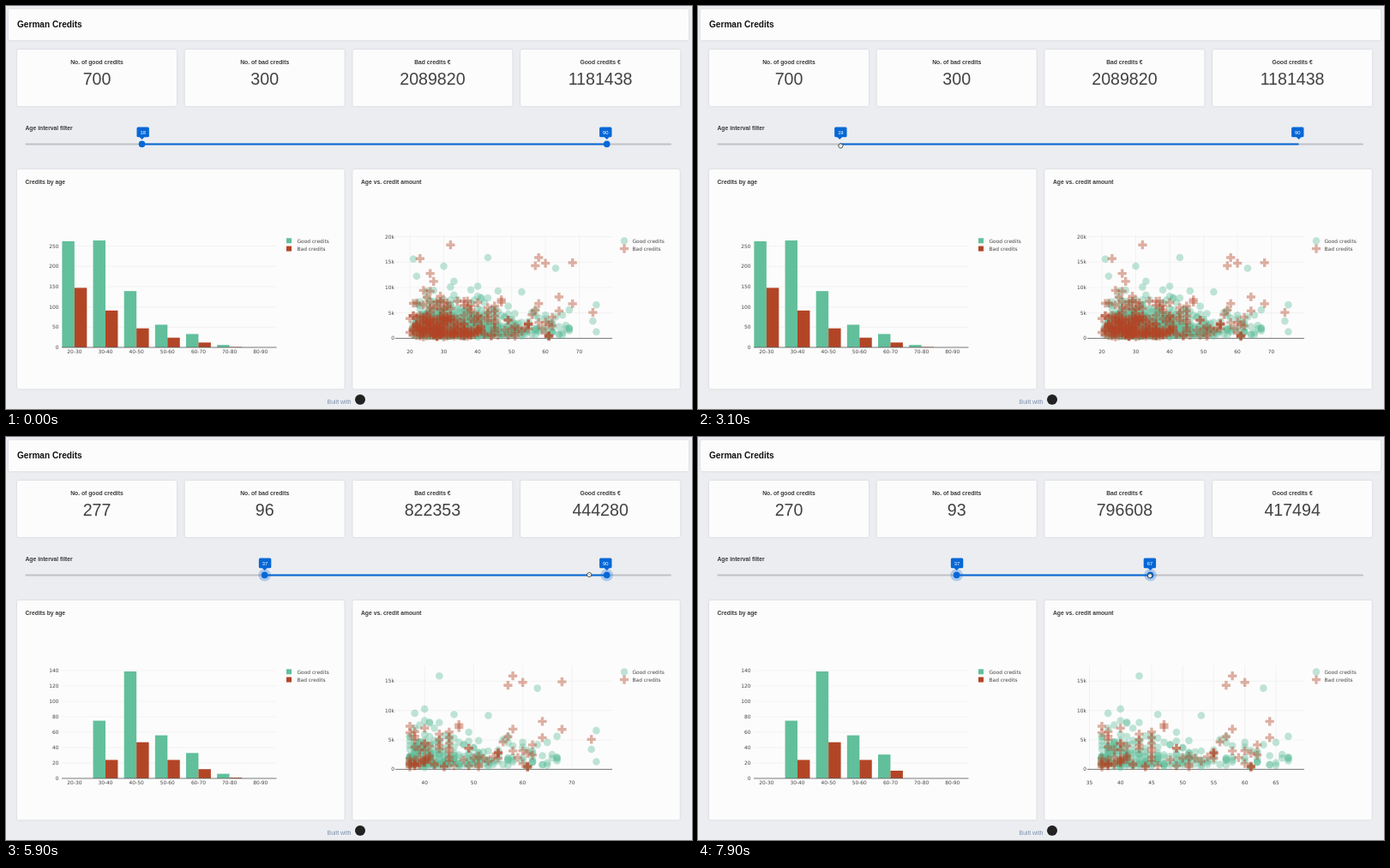
An HTML page that plays this animation: 800x471 px, repeating every 8 s.

```html
<!DOCTYPE html>
<html lang="en">
<head>
<meta charset="utf-8">
<title>German Credits</title>
<style>
html, body { margin: 0; height: 100%; overflow: hidden; background: #ebedf1; }
svg { display: block; width: 100vw; height: 100vh; font-family: "Liberation Sans", Arial, sans-serif; }
.card { fill: #fcfcfc; filter: drop-shadow(0 .5px 1px #0002); }
.head { font-weight: bold; font-size: 6.75px; fill: #3a3a3a; }
.num { font-size: 19.6px; fill: #424242; }
.axis { font: 5.9px "DejaVu Sans", Verdana, sans-serif; fill: #444; }
.grid { stroke: #eee; stroke-width: .7; }
.zero { stroke: #555; stroke-width: .8; }
.pin { font-size: 5.8px; fill: #fff; }
.mid { text-anchor: middle; }
.end { text-anchor: end; }
</style>
</head>
<body>
<svg viewBox="0 0 800 471">
  <g id="page"></g>
  <g id="data"></g>
  <g id="tools"></g>
  <g id="slider"></g>
  <g id="cursor"></g>
</svg>
<script>
const GREEN = '#62bf9b', RED = '#b24526', BLUE = '#0668d6';
const LOOP = 8000;
const $ = id => document.getElementById(id);
const clamp = (v, a, b) => Math.min(b, Math.max(a, v));

const text = (x, y, s, cls, extra = '') => `<text x="${x}" y="${y}" class="${cls}" ${extra}>${s}</text>`;
const rect = (x, y, w, h, attrs) => `<rect x="${x}" y="${y}" width="${w}" height="${h}" ${attrs}/>`;
const line = (x1, y1, x2, y2, cls) => `<path d="M${x1} ${y1}L${x2} ${y2}" class="${cls}"/>`;
const card = (x, y, w, h) => rect(x, y, w, h, 'rx="2" class="card"');
const dot = (x, y) => `<circle cx="${x}" cy="${y}" r="4.3" fill="${GREEN}" opacity=".4"/>`;
const plus = (x, y) => `<path transform="translate(${x} ${y})" fill="${RED}" opacity=".42"
  d="M-1.7-5.1h3.4v3.4h3.4v3.4h-3.4v3.4h-3.4v-3.4h-3.4v-3.4h3.4z"/>`;

// Scatter points [age, thousands]: seeded log-normal in both directions, plus a few extremes
let seed = 4242;
function random() {
  seed = (seed * 16807) % 2147483647;
  return seed / 2147483647;
}
const normal = () => Math.sqrt(-2 * Math.log(random())) * Math.cos(2 * Math.PI * random());

function sample(count, ageScale, ageSpread, median, spread) {
  return Array.from({ length: count }, () => {
    let age, amount;
    do age = Math.floor(19.5 + ageScale * Math.exp(ageSpread * normal())); while (age > 67);
    do amount = median * Math.exp(spread * normal()); while (amount < .3 || amount > 16 - age * .12);
    return [age, amount];
  });
}

const good = [
  ...sample(693, 14, .72, 2, .72),
  [21, 15.6], [30, 14.2], [43, 15.9], [63, 13.8], [75, 6.6], [74, 3.4], [75, 1.3]
];
const bad = [
  ...sample(292, 11.5, .82, 2.1, .85),
  [32, 18.4], [23, 15.7], [57, 14.3], [58, 15.9], [60, 14.8], [68, 14.9], [68, 6.8], [74, 5.1]
];

// Good and bad bars per decade; each filter cuts into one decade and drops those beyond it
const allBars = [[262, 264, 139, 56, 33, 6, 0], [147, 91, 47, 24, 12, 1, 0]];
const olderBars = allBars.map((row, i) => [0, [75, 24][i], ...row.slice(2)]);
const middleBars = olderBars.map((row, i) => [...row.slice(0, 4), [31, 10][i], 0, 0]);

const views = [
  { totals: [700, 300, 2089820, 1181438], ages: [18, 90], bars: allBars },
  { totals: [277, 96, 822353, 444280], ages: [37, 90], bars: olderBars },
  { totals: [270, 93, 796608, 417494], ages: [37, 67], bars: middleBars }
];

const cardX = i => 13 + i * 195.7;

function drawPage() {
  const titles = ['No. of good credits', 'No. of bad credits', 'Bad credits €', 'Good credits €'];
  let s = card(3, 3.5, 793, 36.5) + text(13, 25.2, 'German Credits', 'head', 'style="font-size:10.1px;fill:#111"');
  titles.forEach((title, i) => {
    s += card(cardX(i), 51, 186, 66) + text(cardX(i) + 93, 67.8, title, 'head mid');
  });
  s += text(22.5, 144.5, 'Age interval filter', 'head');
  s += card(13, 191, 381.5, 256.5) + card(404.3, 191, 381.5, 256.5);
  s += text(22.5, 208, 'Credits by age', 'head') + text(414, 208, 'Age vs. credit amount', 'head');
  s += rect(327, 271.3, 6, 6, `fill="${GREEN}"`) + rect(327, 280.6, 6, 6, `fill="${RED}"`);
  s += dot(721, 274.5) + plus(721, 283.6);
  for (const x of [339.5, 730.5])
    s += text(x, 276.6, 'Good credits', 'axis') + text(x, 285.9, 'Bad credits', 'axis');
  s += text(374.5, 465, 'Built with', '', 'font-size="7" fill="#7c8fad"');
  s += '<circle cx="413" cy="460" r="6" fill="#222"/>';
  $('page').innerHTML = s;
}

function drawBars(bars) {
  const base = 399, pitch = 36.15, width = 14.45;
  const top = Math.max(...bars.flat()), unit = 125 / top, step = top > 200 ? 50 : 20;
  let s = '';
  for (let n = 0; n <= top + 1; n += step) {
    const y = base - n * unit;
    if (n) s += line(65, y, 315.5, y, 'grid');
    s += text(61.5, y + 2, n, 'axis end');
  }
  bars.forEach((row, side) => row.forEach((n, i) => {
    const x = 65.4 + i * pitch + side * width;
    s += rect(x, base - n * unit, width, n * unit, `fill="${side ? RED : GREEN}"`);
    if (side) s += text(x, 406, `${20 + i * 10}-${30 + i * 10}`, 'axis mid');
  }));
  return s + line(65, base, 315.5, base, 'zero');
}

function drawScatter([from, to]) {
  const base = 388.4;
  const [goods, bads] = [good, bad].map(list => list.filter(([age]) => age >= from && age <= to));
  const all = [...goods, ...bads], ages = all.map(p => p[0]);
  const low = Math.min(...ages), high = Math.max(...ages), top = Math.max(...all.map(p => p[1]));
  const unit = 217.4 / (high - low), kUnit = 109.2 / top, step = high - low > 35 ? 10 : 5;
  const toX = age => +(471 + (age - low) * unit).toFixed(1);
  const toY = k => +(base - k * kUnit).toFixed(1);
  let s = '';
  for (let age = 0; toX(age) < 707; age += step)
    if (toX(age) > 453) s += line(toX(age), 267, toX(age), base, 'grid') + text(toX(age), 406, age, 'axis mid');
  for (let k = 0; toY(k) > 267; k += 5) {
    s += line(454, toY(k), 707, toY(k), k ? 'grid' : 'zero');
    s += text(453, toY(k) + 2, k ? k + 'k' : 0, 'axis end');
  }
  const marks = (points, mark) => points.map(([age, k]) => mark(toX(age), toY(k))).join('');
  return s + marks(goods, dot) + marks(bads, plus);
}

function drawData(v) {
  const totals = v.totals.map((n, i) => text(cardX(i) + 93, 92.3, n, 'num mid')).join('');
  $('data').innerHTML = totals + drawBars(v.bars) + drawScatter(v.ages);
}

function drawTools() {
  const icon = (x, d) => `<path transform="translate(${x} 224.3)" d="${d}"/>`;
  const box = 'M-3-3h6v6h-6z';
  $('tools').innerHTML = `<g fill="none" stroke="#d0d0d2" stroke-width="1.3">
    ${icon(261, 'M-3.4-1.6h2l.6-1h1.6l.6 1h2v4h-6.8zM-1 .5a1 1 0 1 0 2 0a1 1 0 1 0-2 0')}
    <g stroke="#8e8e92">${icon(276, 'M-2.6-.6a2.2 2.2 0 1 0 4.4 0a2.2 2.2 0 1 0-4.4 0M1.4 1.2L3.6 3.4M-1.4-.6h2')}</g>
    ${icon(288, 'M-3.6 0h7.2M0-3.6v7.2')}
    <g stroke-dasharray="1.5 .9">${icon(300, box)}</g>
    ${icon(312, 'M-2 3.4q1-1 0-2a3 2.4 0 1 1 3 .2z')}
    <g fill="#d0d0d2">${icon(327, box) + icon(339, box)}</g>
    <g stroke="#fcfcfc" stroke-width="1">${icon(327, 'M-2 0h4M0-2v4') + icon(339, 'M-2 0h4')}</g>
    ${icon(350.5, 'M-3-3l6 6M3-3l-6 6')}
    ${icon(362.5, 'M-3.4 0L0-2.8L3.4 0M-2 0v2.4h4v-2.4')}
    </g>` + rect(374, 220.3, 8, 8, 'fill="#7f90ac"');
}

const ageX = age => 23 + age * 7.53;

function drawSlider(lo, hi, mode) {
  const y = 161.4;
  const track = (a, b, color) => rect(a, y - 1, b - a, 2, `rx="1" fill="${color}"`);
  let s = track(22.5, 776, '#c0c1c6') + track(lo, hi, BLUE);
  for (const x of [lo, hi]) {
    const age = (x - 23) / 7.53, mid = x + (.5 - age / 100) * 3.6;
    if (mode == 'focus') s += `<circle cx="${x}" cy="${y}" r="7.2" fill="${BLUE}" opacity=".27"/>`;
    if (mode != 'drag') s += `<circle cx="${x}" cy="${y}" r="3.8" fill="${BLUE}"/>`;
    s += rect(mid - 7.2, 141.6, 14.4, 11.6, `rx="1.5" fill="${BLUE}"`);
    s += `<path d="M${x - 3} 153h6l-3 3z" fill="${BLUE}"/>`;
    s += text(mid, 149.6, Math.round(age), 'pin mid');
  }
  $('slider').innerHTML = s;
}

// Pointer path: [ms, x, y]
const path = [
  [1000, 150, 440], [1500, 155, 299.3], [1900, 159, 163], [3045, 159, 163], [4100, 295.5, 171],
  [4350, 302, 170], [5350, 303, 168], [5900, 680, 161], [6100, 701, 161], [7200, 526.5, 164], [LOOP, 527, 162]
];

function pointer(t) {
  const i = path.findIndex(p => p[0] > t);
  if (i < 1) return null;
  const [t0, x0, y0] = path[i - 1], [t1, x1, y1] = path[i], f = (t - t0) / (t1 - t0);
  return { x: x0 + (x1 - x0) * f, y: y0 + (y1 - y0) * f };
}

const shapes = {
  hand: `<path d="M-2.4-.8q0-1 1-.9q.2-.9 1.1-.7q1-.5 1.4.2q1.1-.2 1.2.8q.7.3.4 1.5q-.2 2.5-2.5 2.5q-1.9 0-2.6-1.9z"
    fill="#fff" stroke="#222" stroke-width=".8"/><path d="M-.9-1v1M.2-1v1M1.3-1v1" stroke="#666" stroke-width=".4"/>`,
  cross: '<path d="M-3 0h6M0-3v6" stroke="#444" stroke-width=".9"/>',
  arrow: '<path d="M0 0v7l1.7-1.5l1.2 2.5l1-.5l-1.1-2.4h2.2z" fill="#222" stroke="#fff" stroke-width=".6"/>'
};

function drawCursor(p) {
  const shape = p && (p.y < 175 ? 'hand' : p.y > 267 && p.y < 399 ? 'cross' : 'arrow');
  $('cursor').innerHTML = p ? `<g transform="translate(${p.x} ${p.y})">${shapes[shape]}</g>` : '';
}

let shown = -1;

function frame(now) {
  const t = now % LOOP, p = pointer(t);
  const view = t < 4700 ? 0 : t < 7450 ? 1 : 2;
  if (view != shown) drawData(views[shown = view]);

  const lo = t < 2700 ? ageX(18) : t < 4450 ? clamp(p.x - 1, ageX(18), ageX(37)) : ageX(37);
  const hi = t < 6100 ? ageX(90) : t < 7300 ? Math.min(p.x - .3, ageX(90)) : ageX(67);
  const dragging = (t >= 2700 && t < 4500) || (t >= 6100 && t < 7300);
  drawSlider(lo, hi, dragging ? 'drag' : t < 2700 ? 'idle' : 'focus');

  $('tools').setAttribute('opacity', clamp(Math.min(t - 1050, 1950 - t) / 300, 0, 1));
  drawCursor(p);
  requestAnimationFrame(frame);
}

drawPage();
drawTools();
requestAnimationFrame(frame);
</script>
</body>
</html>
```
